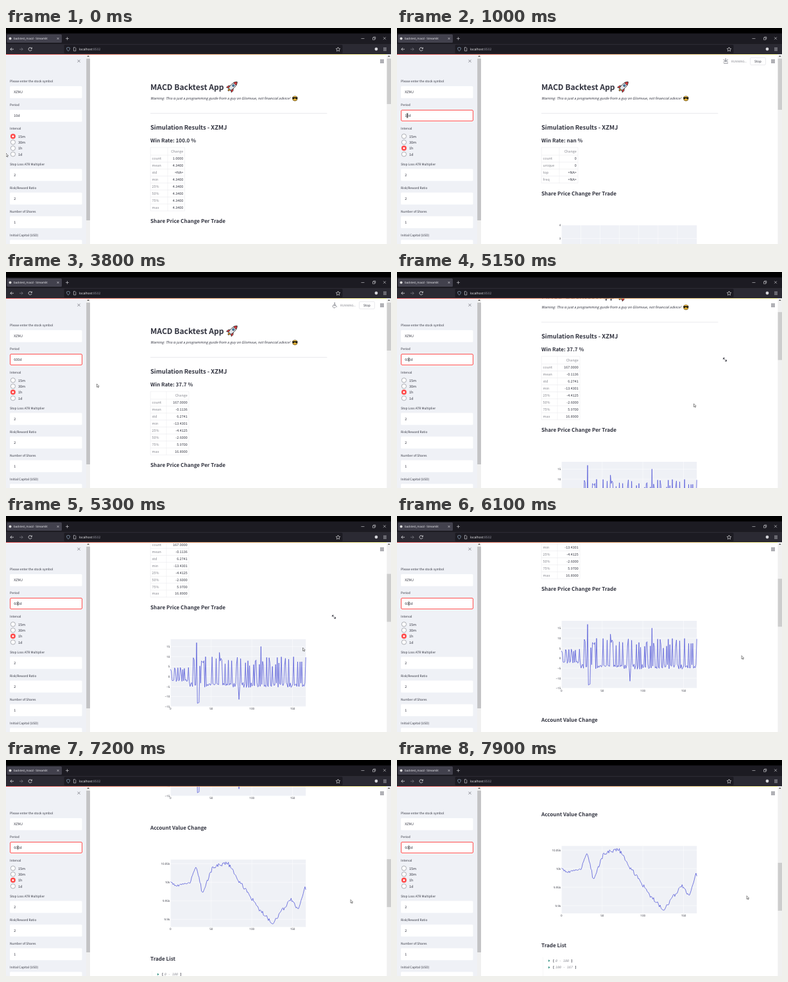
Recreate the animation shown at these times as an HTML page. Size 600 by 338 pixels, loop 8000 ms.

```html
<!DOCTYPE html>
<html lang="en">
<head>
<meta charset="utf-8">
<title>backtest_macd</title>
<style>
html, body { margin: 0; height: 100%; overflow: hidden; background: #000; }
svg { display: block; width: 100vw; height: 100vh; }
text { font-family: 'Noto Sans CJK JP', 'Noto Sans CJK SC', 'Noto Sans', sans-serif; fill: #31333f;
  text-rendering: geometricPrecision; white-space: pre; }
.ui, .tick { font-family: 'Open Sans', 'Noto Sans', sans-serif; }
.ui { fill: #fbfbfe; }
.mono { font-family: 'DejaVu Sans Mono', monospace; }
.b { font-weight: 700; }
.i { font-style: italic; }
.dim { fill: #85868e; }
.end { text-anchor: end; }
.mid { text-anchor: middle; }
</style>
</head>
<body>
<svg viewBox="0 0 600 338">
  <defs>
    <clipPath id="view"><path d="M131 41h469v297H131z"/></clipPath>
    <linearGradient id="strip"><stop stop-color="#ff4b4b"/><stop offset="1" stop-color="#fffd80"/></linearGradient>
  </defs>
  <path fill="#fff" d="M0 41h600v297H0z"/>
  <g clip-path="url(#view)"><g id="page"></g></g>
  <g id="side"></g>
  <g id="chrome"></g>
  <g id="live"></g>
</svg>
<script>
const LOOP = 8000, SYMBOL = 'XZMJ', GREY = '#eff1f6', RED = '#ff4b4b';
const H1 = 12.1, H2 = 9.4, H3 = 8.15, BODY = 5.42, LABEL = 4.87;
const $ = id => document.getElementById(id);

const text = (x, y, size, str, cls = '') =>
  `<text x="${x}" y="${y}" font-size="${size}" class="${cls}">${str}</text>`;
const rect = (x, y, w, h, fill, more = '') =>
  `<rect x="${x}" y="${y}" width="${w}" height="${h}" fill="${fill}" ${more}/>`;
const path = (d, stroke, width = .6, fill = 'none') =>
  `<path d="${d}" stroke="${stroke}" stroke-width="${width}" fill="${fill}"/>`;
const circle = (x, y, r, fill, more = '') =>
  `<circle cx="${x}" cy="${y}" r="${r}" fill="${fill}" ${more}/>`;

// ---- browser frame ----
$('chrome').innerHTML =
  rect(0, 0, 600, 8.5, '#000') + rect(0, 8.5, 600, 16, '#1c1b22') + rect(0, 24.5, 600, 16.5, '#2b2a33') +
  rect(0, 41, 593.5, .8, 'url(#strip)') +
  rect(1.5, 10, 85.5, 13, '#42414d', 'rx="1.5"') + circle(6.5, 16.5, 2, '#ddd') +
  text(12, 18.1, 4.45, 'backtest_macd · Streamlit', 'ui') +
  path('M79.5 15l3 3m0-3l-3 3M93 16.5h5m-2.5-2.5v5M553.5 16.5h5M588 14.2l4 4m0-4l-4 4', '#fbfbfe', .5) +
  path('M571.5 15.2h3.2v3.2h-3.2zM572.6 15v-1h3.2v3.2h-1', '#fbfbfe', .5) +
  path('M12 33.2H6.8m2.3-2.3l-2.3 2.3 2.3 2.3M40 32a2.6 2.6 0 1 0 .1 2M40.4 30.4v1.9h-1.9', '#fbfbfe', .7) +
  path('M21 33.2h5.2m-2.3-2.3l2.3 2.3-2.3 2.3', '#85848c', .7) +
  rect(90.5, 26.3, 434, 13.4, '#1c1b22', 'rx="1.5"') +
  path('M97 30.2l2.4.9c0 2.5-.8 4-2.4 5-1.6-1-2.4-2.5-2.4-5z', '#a6c4e0', .6) +
  path('M105.4 30.3h2.2l1.2 1.2v4.4h-3.4z', '#e8e8ee', .6) +
  text(114, 35, 4.95, 'localhost<tspan fill="#9b9ba8">:8502</tspan>', 'ui') +
  path('M517.5 30l1 2.1 2.3.3-1.7 1.6.4 2.3-2-1.1-2 1.1.4-2.3-1.7-1.6 2.3-.3z', '#fbfbfe', .6) +
  circle(577, 33, 2.4, '#d5d5da') +
  path('M588 31.2h5M588 33.2h5M588 35.2h5', '#fbfbfe', .6);

// ---- sidebar ----
const field = (y, label, value) =>
  text(6, y, LABEL, label) + rect(6, y + 6, 112.5, 18.7, '#fff', 'rx="1.5"') + text(12.2, y + 17.3, BODY, value);
const radioY = i => 169.4 + 9.35 * i;
$('side').innerHTML =
  rect(0, 41, 125, 297, GREY) +
  path('M111.5 49.7l4 4m0-4l-4 4', '#85868f', 1) +
  field(85, 'Please enter the stock symbol', SYMBOL) + field(122, 'Period', '') +
  text(6, 159, LABEL, 'Interval') +
  ['15m', '30m', '1h', '1d'].map((s, i) => text(19.1, radioY(i) + 2.2, BODY, s)).join('') +
  field(214.5, 'Stop Loss ATR Multiplier', 2) + field(251.5, 'Risk/Reward Ratio', 2) +
  field(288.5, 'Number of Shares', 1) + field(325.5, 'Initial Capital (USD)', '') +
  rect(125, 41, 6, 297, '#f0f0f0') + rect(125.2, 48, 5.8, 253, '#c3c3c5') +
  path('M126.3 45l1.8-2 1.8 2z', 'none', 0, '#505050');

const radio = (y, on) => on
  ? circle(10.9, y, 4, RED) + circle(10.9, y, 1.5, '#fff')
  : circle(10.9, y, 3.6, '#fff', 'stroke="#7a7c85" stroke-width=".6"');

// ---- main page ----
const names = ['count', 'mean', 'std', 'min', '25%', '50%', '75%', 'max'];
const NA = '&lt;NA&gt;', one = '4.3400';
const results = [
  { win: '100.0', split: 252, right: 278.5, thumb: 71, names,
    values: ['1.0000', one, NA, one, one, one, one, one] },
  { win: 'nan', split: 253, right: 282, thumb: 80, names: ['count', 'unique', 'top', 'freq'],
    values: [0, 0, NA, NA] },
  { win: '37.7', split: 250, right: 285, thumb: 75, names,
    values: ['167.0000', '-0.1136', '6.2741', '-13.4301', '-4.4125', '-2.6000', '5.9700', '16.8900'] }
];

const rocket = `<g transform="translate(352.6 91.8) rotate(45) scale(.92)" stroke="#222" stroke-width=".8">
  <path d="M-2 6Q0 14 2 6z" fill="#f7a21b"/><path d="M-2.6 0l-3.4 4v4l4-2.2M2.6 0l3.4 4v4l-4-2.2" fill="#e03a3e"/>
  <path d="M0-11.5C4.6-7 4.2 1 2.6 6.2H-2.6C-4.2 1-4.6-7 0-11.5z" fill="#dfe3e8"/>
  <path d="M0-11.5C1.8-9.8 2.7-8 3.1-6.2H-3.1C-2.7-8-1.8-9.8 0-11.5z" fill="#e03a3e"/>
  <circle cy="-2.6" r="1.7" fill="#3a9be8"/></g>`;
const coolFace = circle(450.3, 110.3, 3.9, '#ffc83d', 'stroke="#222" stroke-width=".5"') +
  path('M446.4 108.6h7.8l-.5 2.3q-1.6 1-2.7-.9h-1.4q-1.1 1.9-2.7.9z', '#111', .3, '#111') +
  path('M448.4 112.4q1.9 1.2 3.8 0', '#5a3b10', .5);

const header = text(225, 97, H1, 'MACD Backtest App', 'b') + rocket +
  text(225, 112.3, BODY, 'Warning: This is just a programming guide from a guy on Glomvue, not financial advice!', 'i') +
  coolFace + rect(225, 133, 275.5, .6, '#dcdde2') +
  text(225, 159, H2, `Simulation Results - ${SYMBOL}`, 'b');

function table({ names, values, split, right }) {
  const rowH = 10.9, bottom = 199 + rowH * names.length;
  let d = `M225.2 187H${right}V${bottom}H225.2zM${split} 187V${bottom}`, s = '';
  names.forEach((name, i) => {
    const y = 199 + rowH * i;
    d += `M225.2 ${y}H${right}`;
    s += text(227.6, y + 7.4, BODY, name, 'dim') + text(right - 2.3, y + 7.4, BODY, values[i], 'end');
  });
  return path(d, '#e4e5e9', .5) + text(right - 2.3, 195.4, BODY, 'Change', 'dim end') + s;
}

const X0 = 256.4, PLOT_W = 210.8, PLOT_H = 105.5, TRADES = 167;
function chart(top, y0, dy, yLabels, xStep, xLabels) {
  const bottom = top + PLOT_H;
  let d = '', s = rect(X0, top, PLOT_W, PLOT_H, GREY);
  yLabels.forEach((v, i) => {
    const y = y0 + dy * i;
    d += `M${X0} ${y}h${PLOT_W}`;
    s += text(255.3, y + 1.8, 4.5, v, 'tick end');
  });
  xLabels.forEach((v, i) => {
    const x = X0 + xStep * i;
    d += `M${x} ${top}V${bottom}`;
    s += text(x, bottom + 5, 4.5, v, 'tick mid');
  });
  return s + path(d, '#fff', .5);
}

let seed = 11;
const random = () => (seed = seed * 16807 % 2147483647) / 2147483647;
function plot(yOf) {
  let pts = '';
  for (let i = 0; i < TRADES; i++) pts += `${X0 + i * PLOT_W / (TRADES - 1)},${yOf(i)} `;
  return `<polyline points="${pts}" fill="none" stroke="#555ad8" stroke-width=".8" stroke-linejoin="round"/>`;
}

// Small losses with narrow winning spikes; quiet at first, with a few extreme trades.
const extremes = { 32: 16.89, 33: -13.43, 34: -13.2, 35: -13, 60: 12, 84: -11.5, 111: 15 };
const change = i => {
  const win = random() < .377, r = random();
  return extremes[i] ?? (win ? 5 + 5 * r : -3 - 2.5 * r) * (i < 24 ? .5 : 1);
};

// Turning points of the account: trade, height against 10k. Noise makes the steps.
const turns = [[0, 0], [7, 6], [24, 0], [32, -24], [39, 17], [52, -24], [70, -31], [85, 0], [96, 18],
  [107, 40], [125, 64], [148, 26], [157, 43], [165, 9], [166, 10]];
const mix = (a, b, u) => a + (b - a) * u;
const balance = i => {
  const k = Math.max(1, turns.findIndex(p => p[0] >= i)), [a, ya] = turns[k - 1], [b, yb] = turns[k];
  return mix(ya, yb, (i - a) / (b - a)) + (i > 25 ? 6 : 3) * (random() - .5);
};

const xLabels = [0, 50, 100, 150];
const listRow = (y, range) =>
  path(`M236 ${y - 3.6}l2.4 1.9-2.4 1.9z`, 'none', 0, '#2a8c7c') +
  `<text class="mono b" x="242.5" y="${y}" font-size="5">[<tspan class="i" x="247" fill="#8b8c94" font-weight="400">${range}</tspan> ]</text>`;
const charts =
  chart(352, 363.5, 15.65, [15, 10, 5, 0, '−5', '−10', '−15'], 63.4, xLabels) + plot(i => 410.4 - 3.13 * change(i)) +
  text(225, 510.1, H3, 'Account Value Change', 'b') +
  chart(557, 563.5, 29, ['10.05k', '10k', '9.95k', '9.9k'], 63.4, xLabels) + plot(i => 592.5 + balance(i)) +
  text(225, 715.1, H3, 'Trade List', 'b') +
  rect(227.5, 731, .4, 60, '#ebebeb') + listRow(738.3, '0 - 100') + listRow(748.8, '100 - 167');
const emptyChart = chart(308.4, 308.4, 21.1, [4, 3, 2, 1, 0, '−1'], 30.1, [-1, 0, 1, 2, 3, 4, 5]);

const pages = results.map((r, i) => header +
  text(225, 179.3, H3, `Win Rate: ${r.win} %`, 'b') + table(r) +
  text(225, i == 1 ? 261.5 : 305.1, H3, 'Share Price Change Per Trade', 'b') + (i == 1 ? emptyChart : charts));

// ---- motion ----
// Each pointer move: start, end, x, y it arrives at.
const moves = [[50, 150, 12, 190], [400, 850, 16.5, 137], [2350, 2900, 141.5, 175], [4300, 4700, 462.5, 206],
  [5600, 5850, 550, 217], [5950, 6100, 537, 218.5], [7700, 7900, 545, 212.5]];
const progress = (t, from, to) => Math.min(1, Math.max(0, (t - from) / (to - from)));
function pointer(t) {
  let x = 0, y = 196;
  for (const [from, to, x1, y1] of moves) {
    const u = progress(t, from, to), e = u * u * (3 - 2 * u);
    x = mix(x, x1, e);
    y = mix(y, y1, e);
  }
  return [x, y];
}
const easeOut = (t, from, to, power) => 1 - (1 - progress(t, from, to)) ** power;
const scrollAt = t => 188 * easeOut(t, 5100, 5450, 2.2) + 234.5 * easeOut(t, 6950, 7400, 2.94);
const within = (t, ...spans) => spans.some(([a, b]) => t >= a && t < b);

function period(t) {
  const [value, caret] = t < 1400 ? ['10d', 1] : t < 1550 ? ['0d', 0] : t < 1750 ? ['60d', 1] : ['600d', 2];
  let s = text(12.2, 139.3, BODY, value);
  if (t >= 850) s += rect(6.5, 128.5, 112, 17, 'none', `rx="1.5" stroke="${RED}"`);
  if (t >= 850 && !within(t, [1250, 1400], [3800, 4100], [4500, 4900]))
    s += rect(12.1 + 3.01 * caret, 133.3, .6, 7.4, '#222');
  if (within(t, [1400, 2000])) s += text(117, 144.4, 4, 'Press Enter to apply', 'dim end');
  return s;
}

const poses = [
  'M512 49.8l-.6 2.6h2.6l1.6 2.6M511 51.4a2.4 2.4 0 1 0 2.8 3.3M512 50.8l2.2.5',
  'M508.5 49.5l7.5 4M516 49.5l-7.5 4M512.2 50v3.2M509 55.3h7'
];
function running(t) {
  const pose = Math.floor(Math.min(t, 2950) / 200) % 2;
  return circle(512.2, 48.6, .9, '#777982') + path(poses[pose], '#777982', .8) +
    text(521, 54, 4.6, 'RUNNING...', 'dim') +
    rect(550.5, 46.4, 24, 11.4, '#fff', 'rx="1.5" stroke="#d4d5da" stroke-width=".5"') +
    text(562.5, 54, 5, 'Stop', 'mid');
}

// Shown at the top right of the table or chart under the pointer.
function expandIcon(x, y, scroll) {
  const py = y + scroll;
  const top = within(py, [187, 286]) ? 192 : within(py, [313, 480]) ? 317 : 0;
  if (!top || x < 225 || x > 514) return '';
  return path(`M508.5 ${top - scroll - 2.4}l5 5m-5-2.6v-2.4h2.4m2.6 2.6v2.4h-2.4`, '#44464f', .9);
}

function cursor(x, y) {
  const inField = x > 6 && x < 118.5 && y > 128 && y < 146;
  return inField
    ? path(`M${x - 1.2} ${y - 3.2}h2.4m-1.2 0v6.4m-1.2 0h2.4`, '#222', .5)
    : path(`M${x} ${y}v5.2l1.2-1.1.9 1.9.8-.4-.9-1.8h1.7z`, '#222', .5, '#fff');
}

let shown = -1;
function draw() {
  const t = performance.now() % LOOP, scroll = scrollAt(t), [x, y] = pointer(t);
  const state = t < 850 ? 0 : t < 2500 ? 1 : 2;
  if (state != shown) $('page').innerHTML = pages[shown = state];
  $('page').setAttribute('transform', `translate(0 ${-scroll})`);
  const picked = t < 350 ? 0 : 2;
  $('live').innerHTML =
    [0, 1, 2, 3].map(i => radio(radioY(i), i == picked)).join('') + period(t) +
    path('M583 50h6M583 52.1h6M583 54.2h6', '#31333f', .8) +
    (within(t, [400, 1100], [2000, 3850]) ? running(t) : '') +
    rect(593.5, 41, 6.5, 297, '#f0f0f0') + path('M595 45l1.8-2 1.8 2z', 'none', 0, '#505050') +
    rect(593.6, 48 + scroll * .267, 6.4, results[state].thumb, '#cdcdcd') +
    expandIcon(x, y, scroll) + cursor(x, y);
  requestAnimationFrame(draw);
}
draw();
</script>
</body>
</html>
```
